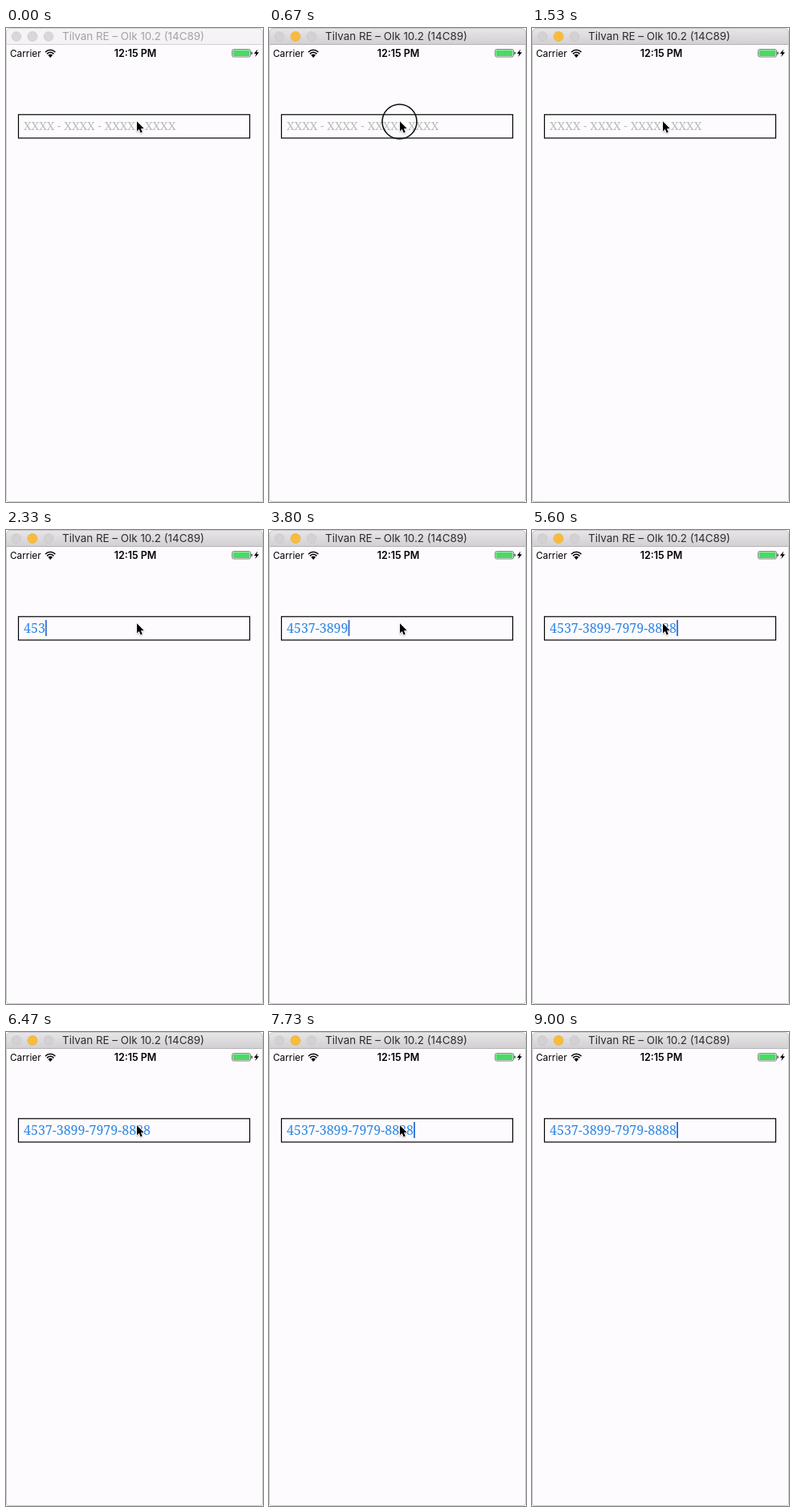
These frames come from a looping animation (320x590 px, 9070 ms). An HTML page with a canvas:

```html
<!DOCTYPE html>
<html lang="en">
<head>
<meta charset="utf-8">
<title>Card number field</title>
<style>
  html, body { margin: 0; width: 100%; height: 100%; overflow: hidden; background: #fff; }
  canvas { display: block; width: 320px; height: 590px; }
</style>
</head>
<body>
<canvas id="stage"></canvas>
<script>
const W = 320, H = 590, LOOP = 9070;
const PAPER = '#fdfbfe', BLUE = '#2c86e2';
const FIELD_FONT = '"Noto Serif", serif', UI_FONT = 'Inter, sans-serif';
const ACTIVATE = 600;

const canvas = document.getElementById('stage');
const ctx = canvas.getContext('2d');
const ratio = window.devicePixelRatio || 1;
canvas.width = W * ratio;
canvas.height = H * ratio;

const CARD = '4537-3899-7979-8888';
// Time of each keystroke; a hyphen arrives together with the digit after it.
const KEYS = [2070, 2200, 2330, 2470, 2870, 3070, 3270, 3470,
              3930, 4130, 4330, 4530, 4800, 5000, 5330, 5530];

const clamp = v => Math.max(0, Math.min(1, v));
const ramp = (t, from, to) => clamp((t - from) / (to - from));
const smooth = v => v * v * (3 - 2 * v);

function typedText(t) {
  const n = KEYS.filter(k => t >= k).length;
  return n ? CARD.slice(0, n + Math.floor((n - 1) / 4)) : '';
}

function caretAlpha(t) {
  if (t < 870) return 0;
  if (t < 1930) return ramp(t, 800, 930) * (1 - ramp(t, 1350, 1530));
  if (t < 6050) return ramp(t, 1900, 2070);
  const phase = (t - 6050) % 1010;
  return phase < 480 ? 1 - ramp(phase, 0, 230) : ramp(phase, 460, 660);
}

function label(text, x, y, font, color, align = 'left') {
  ctx.font = font;
  ctx.fillStyle = color;
  ctx.textAlign = align;
  ctx.fillText(text, x, y);
}

function disc(x, y, r, fill, edge) {
  ctx.beginPath();
  ctx.arc(x, y, r, 0, Math.PI * 2);
  ctx.fillStyle = fill;
  ctx.fill();
  ctx.strokeStyle = edge;
  ctx.lineWidth = 0.6;
  ctx.stroke();
}

function roundRect(x, y, w, h, r) {
  ctx.beginPath();
  ctx.roundRect(x, y, w, h, r);
}

function polygon(points) {
  ctx.beginPath();
  points.forEach(([x, y]) => ctx.lineTo(x, y));
  ctx.closePath();
}

function drawWindow(active) {
  ctx.fillStyle = '#fff';
  ctx.fillRect(0, 0, W, H);

  ctx.save();
  roundRect(0, 0, W, H, [5, 5, 3, 3]);
  ctx.clip();
  ctx.fillStyle = PAPER;
  ctx.fillRect(0, 0, W, H);

  const bar = ctx.createLinearGradient(0, 0, 0, 20);
  bar.addColorStop(0, active ? '#e8e6e8' : '#f6f4f6');
  bar.addColorStop(1, active ? '#d2d0d2' : '#f4f2f4');
  ctx.fillStyle = bar;
  ctx.fillRect(0, 0, W, 20);
  ctx.fillStyle = active ? '#b5b3b5' : '#d3d1d3';
  ctx.fillRect(0, 20, W, 1);
  ctx.restore();

  roundRect(0.5, 0.5, W - 1, H - 1, [5, 5, 3, 3]);
  ctx.strokeStyle = active ? '#c9c7c9' : '#d6d4d6';
  ctx.lineWidth = 1;
  ctx.stroke();

  const gray = active ? '#d3d1d3' : '#d9d7d9';
  disc(13, 10.5, 5.8, gray, '#c3c1c3');
  disc(33, 10.5, 6, active ? '#f8bb3c' : gray, active ? '#e9ae3c' : '#c3c1c3');
  disc(53, 10.5, 5.8, gray, '#c3c1c3');

  label('Tilvan RE – Olk 10.2 (14C89)', 158.5, 15, `13.4px ${UI_FONT}`,
        active ? '#2e2c2e' : '#a3a1a3', 'center');
}

function drawWifi() {
  ctx.save();
  ctx.beginPath();
  ctx.moveTo(55.2, 37);
  ctx.arc(55.2, 36, 10, -Math.PI * 0.75, -Math.PI * 0.25);
  ctx.closePath();
  ctx.clip();
  ctx.strokeStyle = ctx.fillStyle = '#000';
  ctx.lineWidth = 1.6;
  for (const r of [8.3, 5.3]) {
    ctx.beginPath();
    ctx.arc(55.2, 35.6, r, 0, Math.PI * 2);
    ctx.stroke();
  }
  ctx.beginPath();
  ctx.arc(55.2, 35.6, 3, 0, Math.PI * 2);
  ctx.fill();
  ctx.restore();
}

function drawBattery() {
  roundRect(281.5, 26.5, 23, 9.5, 2);
  ctx.strokeStyle = '#666';
  ctx.lineWidth = 0.8;
  ctx.stroke();
  roundRect(282.5, 27.5, 21, 7.5, 1);
  ctx.fillStyle = '#4cd964';
  ctx.fill();
  ctx.fillStyle = '#333';
  roundRect(305.4, 29.6, 1.3, 3.4, [0, 1, 1, 0]);
  ctx.fill();
  polygon([[313.2, 26.5], [308.8, 32], [311.4, 32], [310.2, 36], [315, 30.3], [312.2, 30.3]]);
  ctx.fillStyle = '#000';
  ctx.fill();
}

function drawStatusBar() {
  label('Carrier', 5, 35.5, `11.8px ${UI_FONT}`, '#000');
  label('12:15 PM', 161, 35.5, `600 12.5px ${UI_FONT}`, '#000', 'center');
  drawWifi();
  drawBattery();
}

function drawField(t) {
  ctx.strokeStyle = '#000';
  ctx.lineWidth = 1.2;
  ctx.strokeRect(15.5, 107.8, 288, 29.2);

  const text = typedText(t);
  if (!text) {
    label('XXXX - XXXX - XXXX - XXXX', 22, 127, `300 14.5px ${FIELD_FONT}`, '#bcbabd');
  }
  label(text, 22, 127.5, `16px ${FIELD_FONT}`, BLUE);

  const caretX = 22 + ctx.measureText(text).width;
  ctx.globalAlpha = caretAlpha(t);
  ctx.fillStyle = '#3d78d8';
  ctx.fillRect(caretX, 112, 2, 20);
  ctx.globalAlpha = 1;
}

function drawPress(t) {
  if (t < ACTIVATE) return;
  ctx.globalAlpha = 1 - ramp(t, 800, 1070);
  ctx.beginPath();
  ctx.arc(162.5, 116.5, 21.5, 0, Math.PI * 2);
  ctx.strokeStyle = '#111';
  ctx.lineWidth = 1.6;
  ctx.stroke();
  ctx.globalAlpha = 1;
}

function drawPointer(t) {
  const away = smooth(ramp(t, 8330, 8800));
  ctx.save();
  ctx.translate(163 + 38 * away, 116.3 - 140 * away);
  ctx.scale(0.84, 0.84);
  polygon([[0, 0], [0, 14.6], [3.3, 11.5], [5.6, 16.8], [8, 15.8], [5.8, 10.6], [10.3, 10.3]]);
  ctx.shadowColor = 'rgba(0,0,0,.25)';
  ctx.shadowBlur = 2 * ratio;
  ctx.shadowOffsetY = ratio;
  ctx.lineJoin = 'round';
  ctx.lineWidth = 1.8;
  ctx.strokeStyle = '#fff';
  ctx.stroke();
  ctx.shadowColor = 'transparent';
  ctx.fillStyle = '#000';
  ctx.fill();
  ctx.restore();
}

function render() {
  const t = performance.now() % LOOP;
  ctx.setTransform(ratio, 0, 0, ratio, 0, 0);
  drawWindow(t >= ACTIVATE);
  drawStatusBar();
  drawField(t);
  drawPress(t);
  drawPointer(t);
  requestAnimationFrame(render);
}
render();
</script>
</body>
</html>
```
